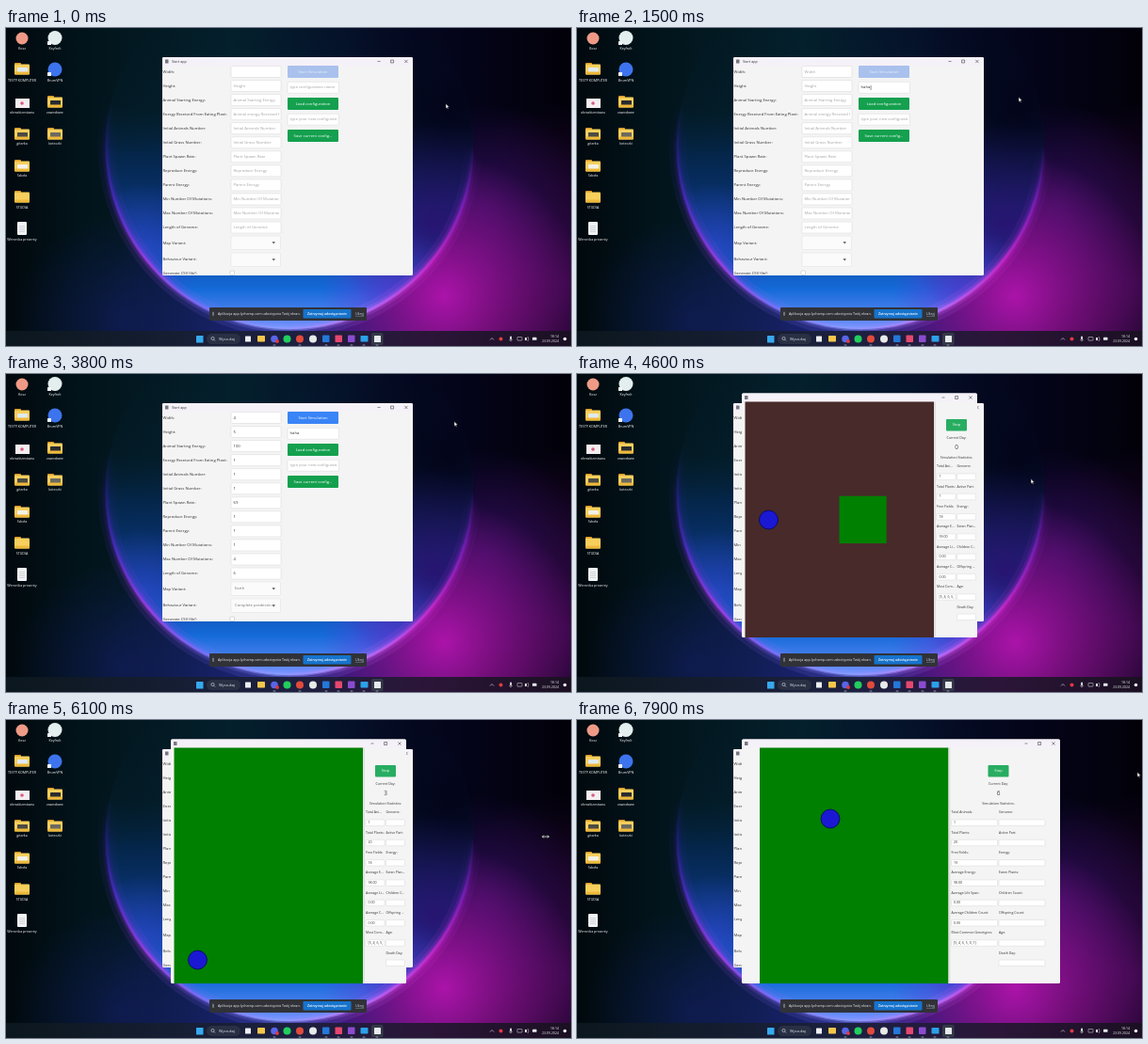
Recreate the animation shown at these times as an HTML page with a canvas. Size 600 by 338 pixels, loop 8000 ms.

```html
<!DOCTYPE html>
<html lang="pl">
<head>
<meta charset="utf-8">
<title>Start app</title>
<style>
html, body { margin: 0; width: 100%; height: 100%; overflow: hidden; background: #04060f; }
canvas { display: block; width: 600px; height: 338px; }
</style>
</head>
<body>
<canvas id="stage"></canvas>
<script>
const LOOP = 8000, W = 600, H = 338;
const canvas = document.getElementById('stage');
const ratio = Math.max(1, window.devicePixelRatio || 1);
canvas.width = W * ratio;
canvas.height = H * ratio;
const g = canvas.getContext('2d');
g.scale(ratio, ratio);

const UI = '"Open Sans", "Noto Sans", sans-serif';
const DARK = '#333', PALE = '#a4a4a4', GREEN = '#14a04e';

function rect(x, y, w, h, fill, r = 0, stroke) {
  g.beginPath();
  g.roundRect(x, y, w, h, r);
  if (fill) { g.fillStyle = fill; g.fill(); }
  if (stroke) { g.strokeStyle = stroke; g.lineWidth = 0.5; g.stroke(); }
}
function disc(x, y, r, fill, stroke, width = 1) {
  g.beginPath();
  g.arc(x, y, r, 0, 7);
  if (fill) { g.fillStyle = fill; g.fill(); }
  if (stroke) { g.strokeStyle = stroke; g.lineWidth = width; g.stroke(); }
}
function text(s, x, y, size = 4.3, fill = DARK, align = 'left', style = '') {
  g.font = `${style} ${size}px ${UI}`;
  g.textAlign = align;
  g.textBaseline = 'middle';
  g.fillStyle = fill;
  g.fillText(s, x, y);
}
function line(points, color, width = 0.6) {
  g.beginPath();
  points.forEach(([x, y]) => g.lineTo(x, y));
  g.strokeStyle = color;
  g.lineWidth = width;
  g.stroke();
}
// Shortens a label with an ellipsis when it is wider than its column
function fit(s, width, size) {
  g.font = `${size}px ${UI}`;
  if (g.measureText(s).width <= width) return s;
  while (s && g.measureText(s + '...').width > width) s = s.slice(0, -1);
  return s + '...';
}
function shade(gradient, stops) {
  stops.forEach(([at, color]) => gradient.addColorStop(at, color));
  return gradient;
}
const across = stops => shade(g.createLinearGradient(0, 0, W, 0), stops);
const down = stops => shade(g.createLinearGradient(0, 0, 0, H), stops);
const flood = fill => rect(0, 0, W, H, fill);
const glow = (x, y, r, color) =>
  flood(shade(g.createRadialGradient(x, y, 0, x, y, r), [[0, color], [1, color.slice(0, 7) + '00']]));

function wallpaper() {
  flood(across([[0, '#01090e'], [0.14, '#02141b'], [0.4, '#04202c'], [0.6, '#05112a'],
    [0.8, '#04041a'], [1, '#020109']]));
  glow(300, 345, 210, '#2a22a0d0');
  glow(120, 310, 110, '#121c60a0');
  glow(590, 270, 190, '#420a58c0');
  glow(510, 190, 110, '#38106ca0');
  glow(465, 285, 150, '#b414b0f0');
  g.save();
  g.beginPath();
  g.arc(301, 125, 195, 0, 7);
  g.clip();
  flood(down([[0, '#04203000'], [0.25, '#04203060'], [0.4, '#052850e0'], [0.65, '#0c3c8c'],
    [0.82, '#146ad8'], [0.95, '#7090ff']]));
  glow(145, 235, 70, '#2f48d0b0');
  glow(470, 90, 130, '#03041af0');
  glow(455, 210, 110, '#2c1070e0');
  glow(410, 285, 75, '#6a30d8a0');
  g.restore();

  const rim = shade(g.createConicGradient(0, 301, 125), [
    [0, '#5a18a000'], [0.05, '#8a20c8'], [0.11, '#e02ad8'], [0.18, '#d070ff'], [0.26, '#8fa0ff'],
    [0.33, '#8a6cff'], [0.39, '#b43cf0'], [0.45, '#5a2ad0'], [0.5, '#2a1c90a0'], [0.54, '#0a204000']
  ]);
  for (const [width, alpha] of [[18, 0.12], [9, 0.2], [4, 0.45], [1.4, 0.5]]) {
    g.globalAlpha = alpha;
    disc(301, 125, 194.5, null, rim, width);
  }
  g.globalAlpha = 1;
}

function folder(x, y, inner) {
  rect(x - 8, y - 6, 7, 4, '#d99a22', 1);
  rect(x - 8, y - 4.5, 16, 11, '#f7cf5c', 1);
  if (inner) rect(x - 5, y - 1, 11, 5, inner, 0.5);
  rect(x - 8, y + 3.5, 16, 3, '#eeb93c', 1);
}
function desktop() {
  disc(17, 11, 6.5, '#ee9a86');
  rect(10, 75, 15, 10, '#f4eef0');
  disc(17, 80, 1.8, '#d75a86');
  rect(12, 206, 10, 14, '#f2f3f5', 1);
  for (let y = 210; y < 218; y += 2) rect(14, y, 6, 0.6, '#b9bfc8');
  folder(17, 43, '#dfe9f2');
  folder(17, 112, '#4c4a42');
  folder(17, 146, '#f3f1e8');
  folder(17, 179);
  folder(52, 78, '#2a2b30');
  folder(52, 112, '#6c6a60');
  disc(52, 10.5, 7.5, '#e3eeee');
  disc(52, 44, 7.5, '#3d74ee');
  for (const y of [17, 50]) rect(44, y - 3, 4, 4, '#f4f6fa', 0.5);
  const labels = [
    ['Kosz', 17, 22], ['TESTY KOMPUTER', 17, 56], ['obrazkizestawu', 17, 90],
    ['gitarka', 17, 123.5], ['Szkoła', 17, 157], ['STUDIA', 17, 191],
    ['Weronika prezenty', 17, 225], ['Keyfrolt', 52, 22], ['BrumVPN', 52, 56],
    ['zawodowe', 52, 90], ['koteczki', 52, 123.5]
  ];
  labels.forEach(([s, x, y]) => text(s, x, y, 3.6, '#fff', 'center'));
}

function taskbar() {
  rect(0, 322, W, 16, across([[0, '#0b171d'], [0.25, '#141d30'], [0.5, '#1d2040'],
    [0.75, '#2b1538'], [1, '#1a1022']]));
  rect(202, 327, 7.5, 7.5, '#36a9ee', 0.5);
  rect(213, 325, 36, 11, '#293044', 5.5);
  disc(219.5, 330, 1.6, null, '#dfe5ee', 0.6);
  line([[220.7, 331.2], [222, 332.6]], '#dfe5ee');
  text('Wyszukaj', 226, 330.5, 3.9, '#e4e8ef');
  rect(254, 327.5, 6, 6, '#eceef2', 0.5);
  rect(267, 327, 8, 6.5, '#f5c64a', 0.8);
  disc(285, 330.5, 3.8, '#5865e8');
  disc(288, 333, 1.9, '#e3393f');
  disc(298.5, 330.5, 4, '#22ce5d');
  disc(312, 330.5, 4, '#e24a3b');
  disc(326, 330.5, 4, '#e7ebe8');
  rect(336, 326.5, 7.5, 7.5, '#2378d8', 0.8);
  rect(349.5, 326.5, 7.5, 7.5, '#e4476f', 0.8);
  rect(363, 326.5, 7.5, 7.5, '#8b4bd0', 0.8);
  rect(376.5, 327, 8, 6.5, '#2ca0e8', 0.8);
  rect(388, 324, 12.5, 13, '#343a48', 1.5);
  rect(391, 327, 7, 7, '#e7e9ed', 0.5);
  for (const x of [285, 312, 340, 353, 367, 380, 394]) rect(x - 1.5, 336.6, 3, 0.8, '#8e98a8', 0.4);
  line([[514, 331.5], [516, 329.5], [518, 331.5]], '#e6e9ef');
  disc(525.5, 330.5, 2, '#df3c42');
  rect(535.2, 327.5, 1.8, 4, '#e6e9ef', 0.9);
  line([[534.3, 331], [536, 333], [537.8, 331]], '#e6e9ef', 0.5);
  rect(543, 328.5, 5, 3.6, null, 0.4, '#e6e9ef');
  rect(551, 329, 2, 3, '#e6e9ef');
  line([[554, 328], [555, 330.5], [554, 333]], '#e6e9ef', 0.5);
  rect(559, 328.8, 4.5, 3, '#e6e9ef', 0.6);
  text('18:14', 587, 328.5, 3.5, '#f0f2f5', 'right');
  text('23.09.2024', 587, 333.5, 3.5, '#f0f2f5', 'right');
  disc(593.5, 330.5, 1.8, '#e6e9ef');
}

function shareBar() {
  rect(216, 297, 167, 14, '#303238', 1);
  rect(219, 301.8, 0.6, 4, '#9a9da5');
  rect(220.4, 301.8, 0.6, 4, '#9a9da5');
  text('Aplikacja app.lychamp.com udostępnia Twój ekran.', 225, 304, 3.7, '#eceef1');
  rect(315.5, 299, 51, 9.5, '#1673cc', 1);
  text('Zatrzymaj udostępnianie', 341, 304, 3.5, '#fff', 'center', '600');
  text('Ukryj', 375.5, 304, 3.7, '#c8d5ea', 'center');
  line([[371, 306.4], [380, 306.4]], '#c8d5ea', 0.3);
}

function windowFrame(x, y, right, bottom, title) {
  rect(x, y, right - x, bottom - y, '#f4f4f4', 1.5);
  rect(x, y, right - x, 9, '#f5f1f8', [1.5, 1.5, 0, 0]);
  rect(x + 3, y + 2.5, 3.5, 4, '#77777e', 0.3);
  if (title) text(title, x + 10, y + 4.6, 3.7, '#333');
  const cy = y + 4.5;
  line([[right - 37.5, cy], [right - 34.5, cy]], '#222', 0.5);
  rect(right - 23.4, cy - 1.5, 3, 3, null, 0, '#222');
  line([[right - 8.7, cy - 1.6], [right - 5.5, cy + 1.6]], '#222', 0.5);
  line([[right - 8.7, cy + 1.6], [right - 5.5, cy - 1.6]], '#222', 0.5);
}

function field(x, y, w, h, value, hint) {
  rect(x, y - h / 2, w, h, '#fff', 0.8, '#d7d7d9');
  g.save();
  g.beginPath();
  g.rect(x, y - h, w - 2, h * 2);
  g.clip();
  text(value || hint || '', x + 2.5, y, h < 9 ? 3.6 : 4.2, value ? DARK : PALE);
  g.restore();
}
function button(y, label, fill, color = '#fff') {
  rect(299, y - 6.5, 54, 13, fill, 1);
  text(label, 326, y, 4.2, color, 'center');
}
function combo(y, value, style) {
  rect(239, y - 7, 52.5, 14.5, '#fbfbfb', 0.8, '#dedee0');
  text(value, 243, y + 0.3, 4.2, '#777', 'left', style);
  g.beginPath();
  g.moveTo(282.5, y - 0.8); g.lineTo(286, y - 0.8); g.lineTo(284.2, y + 1.4);
  g.fillStyle = '#555';
  g.fill();
}

const FORM = [
  ['Width', 4], ['Height', 5], ['Animal Starting Energy', 100],
  ['Energy Received From Eating Plant', 1, 'Animal energy Received From'],
  ['Initial Animals Number', 1], ['Initial Grass Number', 1], ['Plant Spawn Rate', 69],
  ['Reproduce Energy', 1], ['Parent Energy', 1], ['Min Number Of Mutations', 1],
  ['Max Number Of Mutations', 4], ['Length of Genome', 6]
];
function startForm(t) {
  const loaded = t >= 2200;
  windowFrame(166, 31, 432, 263, 'Start app');
  g.save();
  g.beginPath();
  g.rect(166, 40, 266, 223);
  g.clip();
  FORM.forEach(([label, value, hint = label], i) => {
    const y = 46.5 + i * 15.05;
    text(label + ':', 166.5, y, 4.2);
    field(239, y, 53, 12, loaded && String(value), i || t > 450 ? hint : '');
  });
  text('Map Variant:', 166.5, 228.5, 4.2);
  combo(228, loaded ? 'Earth' : '', '');
  text('Behaviour Variant:', 166.5, 246, 4.2);
  combo(246, loaded ? 'Complete predestin...' : '', t < 3000 ? 'italic' : '');
  text('Generate CSV file?:', 166.5, 260.5, 4.2);
  rect(238, 258, 4.5, 4.5, '#fff', 0.6, '#b5b5b8');
  button(46.5, 'Start Simulation', loaded ? '#3984f6' : '#a9c1ec', loaded ? '#fff' : '#e9f0fc');
  const typed = Math.max(0, Math.floor((t - 800) / 120));
  const focused = t > 450 && t < 2200;
  field(299, 63.3, 54.5, 12, 'haha'.slice(0, typed), focused ? '' : 'type configuration name');
  if (focused) rect(302 + Math.min(typed, 4) * 2.45, 61, 0.5, 5, '#222');
  button(80.5, 'Load configuration', GREEN);
  field(299, 97.3, 54.5, 12, '', 'type your new configuration');
  button(114.5, 'Save current config...', GREEN);
  g.restore();
}

// Animal cell for each day
const PATH = [[0, 2], [0, 3], [0, 4], [0, 4], [0, 3], [0, 2], [1, 1]];
const STATS = ['Total Animals:', 'Total Plants:', 'Free Fields:', 'Average Energy:',
  'Average Life Span:', 'Average Children Count:', 'Most Common Genotypes:'];
const DETAILS = ['Genome:', 'Active Part:', 'Energy:', 'Eaten Plants:', 'Children Count:',
  'Offspring Count:', 'Age:', 'Death Day:'];
function simulation(t, right) {
  const day = Math.min(6, Math.floor((t - 4400) / 550));
  windowFrame(175, 20.5, right, 280, '');
  const left = Math.max(178.5, 175 + (right - 175 - 300) / 2);
  const [col, row] = PATH[day];
  rect(left, 29.5, 200.5, 250.5, day ? '#008000' : '#482a2a');
  if (!day) rect(left + 100, 129.8, 50.2, 50.2, '#008000');
  disc(left + 25 + col * 50, 155 + (row - 2) * 50, 10, '#1a18d2', '#07075a', 0.8);
  rect(left + 200.5, 29.5, 2, 250.5, '#e2e2e4');

  const x = left + 203.5, width = Math.min(50, (right - x - 1) / 2), mid = x + width;
  rect(mid - 11, 48, 22, 12.5, '#27ad61', 1);
  text('Stop', mid, 54.4, 4, '#fff', 'center');
  text('Current Day:', mid, 68, 3.6, DARK, 'center');
  text(day, mid, 78.3, 6.5, '#444', 'center');
  text('Simulation Statistics:', mid, 89.3, 3.6, DARK, 'center');
  const values = ['1', day ? '20' : '1', day > 3 ? '19' : '18', day ? '98.00' : '99.00',
    '0.00', '0.00', '[5, 4, 6, 5, 0, 1]'];
  DETAILS.forEach((detail, i) => {
    const y = 98.5 + i * 21.3;
    if (STATS[i]) {
      text(fit(STATS[i], width - 1, 3.5), x, y, 3.5);
      field(x, y + 10.7, width - 1, 6.5, values[i]);
    }
    text(fit(detail, width, 3.5), mid + 0.5, y, 3.5);
    field(mid + 0.5, y + 10.7, width - 1, 6.5, '');
  });
}

const POINTER = [
  [0, 468, 83], [450, 330, 64], [900, 335, 66], [1500, 470, 76], [2050, 340, 82],
  [2250, 340, 82], [2600, 380, 130], [3800, 477, 53], [4200, 335, 47], [4320, 335, 47],
  [4600, 483, 114], [5500, 425, 124], [5750, 425, 124], [6100, 573, 124],
  [6600, 513, 124], [6900, 513, 124], [7900, 596, 58], [8000, 596, 58]
];
function pointerAt(t) {
  const i = POINTER.findIndex(p => p[0] > t);
  const [t0, x0, y0] = POINTER[i - 1], [t1, x1, y1] = POINTER[i];
  const u = (t - t0) / (t1 - t0), e = u * u * (3 - 2 * u);
  return [x0 + (x1 - x0) * e, y0 + (y1 - y0) * e];
}
function pointer(t, x, y) {
  g.save();
  g.translate(x, y);
  if (t > 5500 && t < 6900) {
    for (const [color, width] of [['#000', 1.8], ['#fff', 0.8]]) {
      line([[-3.5, 0], [3.5, 0]], color, width);
      line([[-2, -1.5], [-3.5, 0], [-2, 1.5]], color, width);
      line([[2, -1.5], [3.5, 0], [2, 1.5]], color, width);
    }
  } else {
    g.beginPath();
    [[-1, -2.5], [-1, 2.6], [0.2, 1.6], [1, 3.3], [1.8, 2.9], [1.1, 1.2], [2.6, 1.1]]
      .forEach(p => g.lineTo(...p));
    g.closePath();
    g.fillStyle = '#fff';
    g.fill();
    g.strokeStyle = '#111';
    g.lineWidth = 0.5;
    g.stroke();
  }
  g.restore();
}

const start = performance.now();
function draw() {
  const t = (performance.now() - start) % LOOP;
  const [x, y] = pointerAt(t);
  wallpaper();
  desktop();
  startForm(t);
  if (t >= 4400) simulation(t, t < 6200 ? 425 : t < 6900 ? x : 513);
  shareBar();
  taskbar();
  pointer(t, x, y);
  requestAnimationFrame(draw);
}
draw();
</script>
</body>
</html>
```
